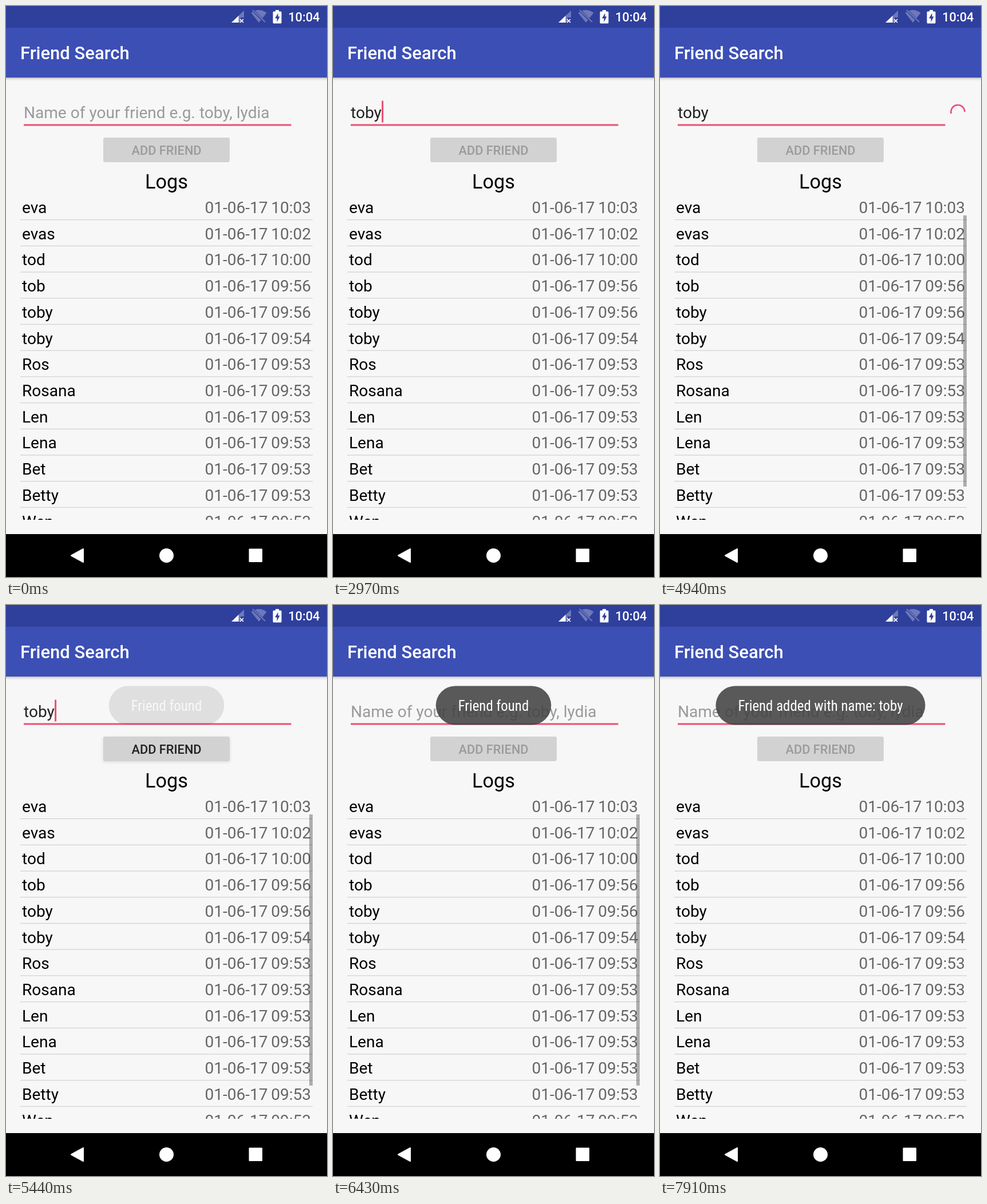
Recreate the animation shown at these times as an HTML page. Size 561 px wide and 998 px high, loop 8000 ms.

```html
<!DOCTYPE html>
<html lang="en">
<head>
<meta charset="utf-8">
<title>Friend Search</title>
<style>
html, body { margin: 0; width: 100%; height: 100%; overflow: hidden; background: #f7f7f8; }
svg { display: block; width: 100%; height: 100%; font-family: Roboto, sans-serif; }
.mid { text-anchor: middle; }
.end { text-anchor: end; }
.med { font-weight: 500; }
.row, .field { font-size: 28.05px; }
.toast text { font-family: "Roboto Condensed", Roboto, sans-serif; font-stretch: 75%; fill: #fff; }
</style>
</head>
<body>
<svg viewBox="0 0 561 998">
  <defs>
    <linearGradient id="shade" x2="0" y2="1">
      <stop stop-color="#000" stop-opacity=".26"/>
      <stop offset=".4" stop-color="#000" stop-opacity=".09"/>
      <stop offset="1" stop-color="#000" stop-opacity="0"/>
    </linearGradient>
    <filter id="blur" x="-10%" y="-30%" width="120%" height="160%"><feGaussianBlur stdDeviation="2.4"/></filter>
    <clipPath id="listClip"><path d="M0 330H561V898H0Z"/></clipPath>
  </defs>
  <rect width="561" height="998" fill="#f7f7f8"/>
  <rect y="125" width="561" height="6" fill="url(#shade)"/>
  <rect width="561" height="125" fill="#3c4fb5"/>
  <rect width="561" height="38" fill="#2f3f9c"/>

  <g fill="#fff">
    <path d="M416 8V20H410V29H394Z" opacity=".3"/>
    <path d="M406.500 17V29H394Z"/>
    <path d="M409 23l6 6m0-6l-6 6" stroke="#fff" stroke-width="1.7"/>
    <path d="M428.500 12Q442 2 455.500 12L442 29Z" opacity=".3"/>
    <path d="M430 6L453 29" stroke="#2f3f9c" stroke-width="4"/>
    <path d="M431 7L453 28" stroke="#fff" stroke-width="2" opacity=".3"/>
    <path d="M471 7h6v2.500h3q1.500 0 1.500 1.500v18q0 1.500-1.500 1.500h-12q-1.500 0-1.500-1.500v-18q0-1.500 1.500-1.500h3z"/>
    <path d="M475.500 12.500L470 21.500h3.500v6.500l5-9.500h-3z" fill="#2f3f9c"/>
    <text class="end med" x="548.500" y="27" font-size="21.8">10:04</text>
    <text class="med" x="25" y="93" font-size="31">Friend Search</text>
  </g>

  <text id="hint" class="field" x="31" y="196" fill="#9a9a9a">Name of your friend e.g. toby, lydia</text>
  <text id="typed" class="field" x="31" y="196" fill="#212121"></text>
  <rect x="31" y="206.500" width="467.500" height="3" fill="#ec4f74"/>
  <rect id="cursor" y="165.500" width="3" height="38" fill="#ec4f74"/>
  <path id="spinner" fill="none" stroke="#ec4f74" stroke-width="2.700"/>

  <rect id="lift" x="169.500" y="231" width="222" height="44" rx="3" fill="#000" filter="url(#blur)"/>
  <rect x="170" y="230" width="221" height="43" rx="3" fill="#d2d2d2"/>
  <text id="label" class="mid med" x="280.500" y="260" font-size="21.8">ADD FRIEND</text>

  <text class="mid" x="280.500" y="319" font-size="34.3">Logs</text>
  <g id="list" clip-path="url(#listClip)"></g>
  <rect id="scrollbar" x="530" y="366" width="6" height="474"/>

  <g id="toasts"></g>

  <rect y="923" width="561" height="75"/>
  <g fill="#fff" stroke="#fff" stroke-width="2" stroke-linejoin="round">
    <path d="M135 949V972L114 960.500Z"/>
    <circle cx="280.500" cy="960.500" r="11.500"/>
    <rect x="425.500" y="949.500" width="21.500" height="21.500"/>
  </g>
</svg>
<script>
const NS = 'http://www.w3.org/2000/svg';
const LOOP = 8000, TICK = 164.8;
const SEARCH = 4100, FOUND = 5400, ADDED = 6050, NEXT_TOAST = 7340;
const FIELD_X = 31, ROW = 45.71;

const $ = id => document.getElementById(id);
const clamp = x => Math.min(1, Math.max(0, x));
const ramp = (t, start, length) => clamp((t - start) / length);
const easeOut = x => 1 - (1 - x) ** 2;
const show = (id, opacity) => $(id).setAttribute('opacity', +opacity);

function add(parent, tag, attrs, text = '') {
  const el = document.createElementNS(NS, tag);
  for (const key in attrs) el.setAttribute(key, attrs[key]);
  el.textContent = text;
  return parent.appendChild(el);
}

const logs = [
  ['eva', '10:03'], ['evas', '10:02'], ['tod', '10:00'], ['tob', '09:56'],
  ['toby', '09:56'], ['toby', '09:54'],
  ...['Ros', 'Rosana', 'Len', 'Lena', 'Bet', 'Betty', 'Wen'].map(name => [name, '09:53'])
];
logs.forEach(([name, time], i) => {
  const y = 362 + i * ROW;
  add($('list'), 'text', { class: 'row', x: 28, y }, name);
  add($('list'), 'text', { class: 'row', x: 347.5, y, fill: '#666' }, '01-06-17');
  add($('list'), 'text', { class: 'row end', x: 533, y, fill: '#666' }, time);
  add($('list'), 'rect', { x: 25, y: y + 11, width: 511, height: 1.2, fill: '#d0d0d0' });
});

// The pill wraps its text; a smaller size serves when no condensed face exists.
function makeToast(message) {
  const group = add($('toasts'), 'g', { class: 'toast' });
  const pill = add(group, 'rect', { y: 141.5, height: 68, rx: 34, fill: '#424242', 'fill-opacity': .87 });
  const text = add(group, 'text', { class: 'mid', x: 280.5, y: 185, 'font-size': 24.9 }, message);
  if (text.getComputedTextLength() > message.length * 10.8) {
    text.setAttribute('font-size', 22);
    text.setAttribute('y', 184.5);
  }
  const width = text.getComputedTextLength() + 78;
  pill.setAttribute('x', 280.5 - width / 2);
  pill.setAttribute('width', width);
  return group;
}
const foundToast = makeToast('Friend found');
const addedToast = makeToast('Friend added with name: toby');

const typing = [[0, ''], [1800, 't'], [1970, 'to'], [2790, 'tob'], [2960, 'toby'], [6090, '']];
const blinks = [485, 985, 1475, 2465, 2795, 3620, 4115, 4775, 5270, 5925, 6590, 7080, 7415, 7905];

// cubic-bezier(.4, 0, .2, 1)
function standardEase(x) {
  let lo = 0, hi = 1, s = .5;
  for (let i = 0; i < 16; i++) {
    s = (lo + hi) / 2;
    const at = 1.2 * (1 - s) ** 2 * s + .6 * (1 - s) * s * s + s ** 3;
    if (at < x) lo = s; else hi = s;
  }
  return 3 * (1 - s) * s * s + s ** 3;
}

function spinnerPath(age) {
  const p = age / 1333 % 1;
  const turn = age / 4444 * 2 + p / 4 - 14 / 360;
  const tail = turn + .75 * standardEase(clamp(2 * p - 1));
  const head = turn + .75 * standardEase(clamp(2 * p));
  const point = a => {
    const angle = a * 2 * Math.PI;
    return `${520.5 + 12 * Math.sin(angle)} ${185 - 12 * Math.cos(angle)}`;
  };
  return `M${point(tail)}A12 12 0 ${+(head - tail > .5)} 1 ${point(head)}`;
}

function draw(t) {
  const typed = typing.filter(([at]) => at <= t).pop()[1];
  $('typed').textContent = typed;
  show('hint', !typed);

  const width = typed ? $('typed').getComputedTextLength() : 0;
  $('cursor').setAttribute('x', FIELD_X + width + .3);
  show('cursor', blinks.filter(at => at <= t).length % 2);

  const searching = t >= SEARCH && t < FOUND;
  show('spinner', searching);
  if (searching) $('spinner').setAttribute('d', spinnerPath(t - SEARCH));

  const enabled = t >= FOUND && t < ADDED;
  $('label').setAttribute('fill', enabled ? '#212121' : '#9b9b9b');
  show('lift', .38 * (ramp(t, FOUND, 150) - ramp(t, ADDED, 300)));
  show('scrollbar', t < 3950 ? 0 : .3 * (1 - ramp(t, 7420, 300)));

  const leaving = ramp(t, NEXT_TOAST, 400) ** 2;
  foundToast.setAttribute('opacity', easeOut(ramp(t, FOUND, 500)) * (1 - leaving));
  addedToast.setAttribute('opacity', easeOut(ramp(t, NEXT_TOAST, 500)));
}

// The screen refreshes in even ticks, as in a recording.
function loop() {
  const t = performance.now() % LOOP;
  draw(Math.floor((t + 5) / TICK) * TICK);
  requestAnimationFrame(loop);
}
loop();
</script>
</body>
</html>
```
